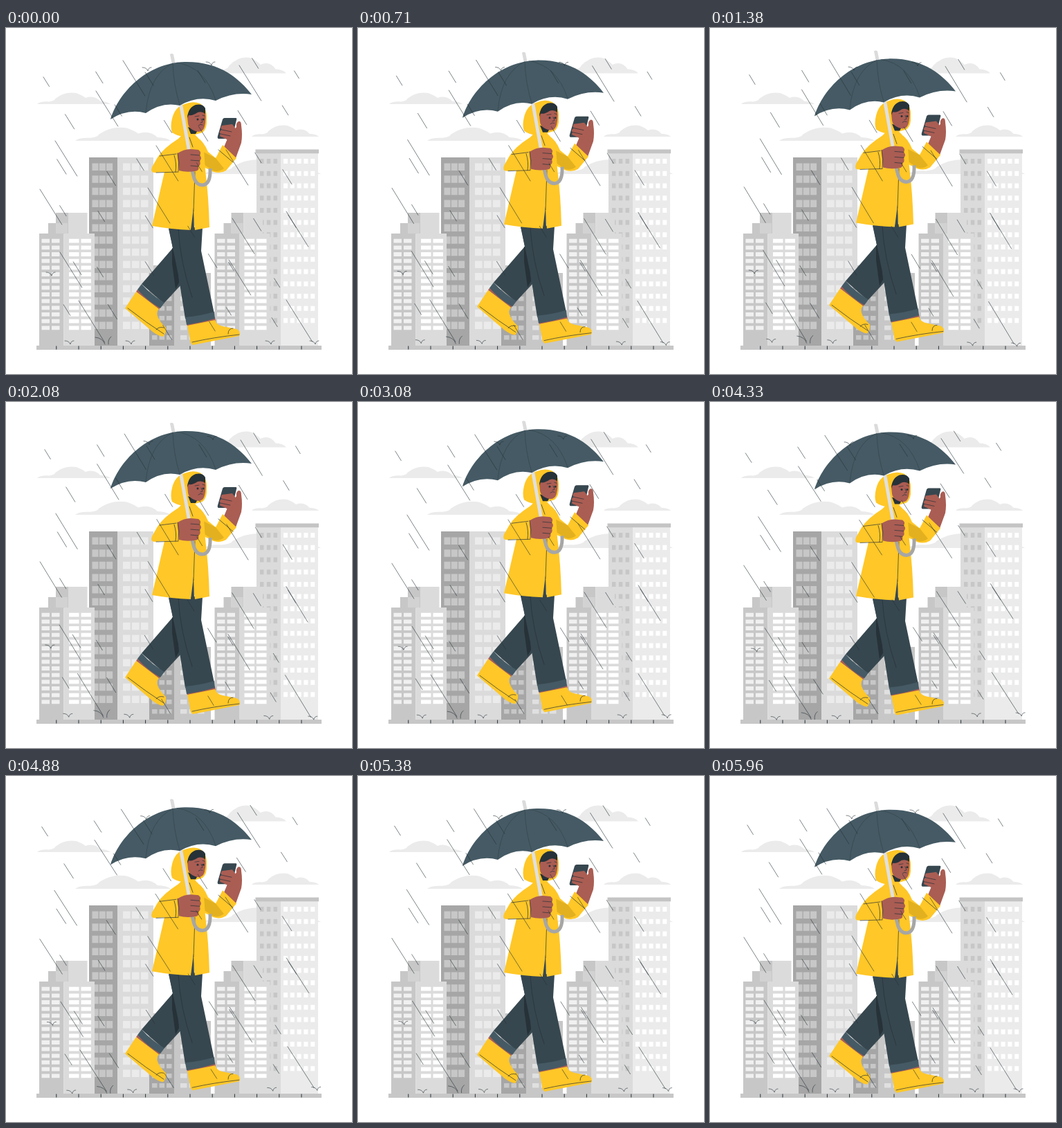
An HTML page that plays this animation: 500 by 500 pixels, repeating every 6 s.

```html
<!DOCTYPE html>
<html lang="en">
<head>
<meta charset="utf-8">
<title>Walking in the rain</title>
<style>
html, body { margin: 0; width: 100%; height: 100%; overflow: hidden; background: #fff; }
svg { display: block; width: 100vw; height: 100vh; }
.ink { fill: none; stroke: #263238; stroke-width: .7; stroke-linecap: round; stroke-linejoin: round; }
.dark { fill: #263238; }
.yellow { fill: #ffc727; }
.skin { fill: #aa5d53; }
.denim { fill: #37474f; }
.slate { fill: #455a64; }
#rain { stroke-width: .6; }
</style>
</head>
<body>
<svg viewBox="0 0 500 500">
  <g id="clouds" fill="#ebebeb"></g>
  <g id="city"></g>
  <path fill="#c7c7c7" d="M44 459H456V465H44Z"/>
  <path class="ink" stroke-dasharray="1 31.2" style="stroke-width:5;stroke-linecap:butt" d="M72.3 462H428"/>

  <g id="walker">
    <!-- far leg -->
    <path class="denim" d="M235 290L241 318L196 370L228 398L254 370L268 300Z"/>
    <path class="dark" d="M240 318L247 322L250 368L245 377L240 340Z"/>
    <path class="skin" d="M190 378L223 403L221 407L188 381Z"/>
    <path class="slate" d="M196 370Q210 386 229 397L223 405Q204 394 190 378Z"/>
    <path class="yellow" d="M188 381L221 406Q217 411 219 416Q222 425 231 433Q232 441 227 446Q220 445 212 439L172 405Z"/>
    <path class="ink" d="M176 405Q203 426 228 442M217 436Q221 431 228 433"/>
    <!-- near leg -->
    <path class="denim" d="M235 288H284L282 322L301 413L259 420L249 357Z"/>
    <path class="ink" d="M249 291Q252 340 269 389"/>
    <path class="skin" d="M261 425L302 418L303 424L262 431Z"/>
    <path class="slate" d="M259 418Q281 416 301 410L302 420Q281 426 261 429Z"/>
    <path class="yellow" d="M262 430L302 422Q304 429 313 431L333 435Q340 438 337 445L270 458Q266 456 266 450Z"/>
    <path class="ink" d="M269 454Q300 447 337 443M321 442Q321 434 328 434"/>
    <!-- phone arm -->
    <path class="skin" d="M315 172L320 160L329 149L333 143Q332 137 336 135Q340 134 340 141Q342 155 340 166L332 188Z"/>
    <path class="yellow" d="M276 158Q286 164 292 179L303 188L313 169L333 188L318 206Q310 211 300 208L282 199Z"/>
    <path fill="#e3b11f" d="M281 177L303 188L315 203Q307 209 299 206L284 196Z"/>
    <path class="ink" d="M307 176L328 194"/>
    <path class="denim" d="M316 130H332Q334 130 333 133L327 158Q326 160 323 160H307Q305 159 306 156L313 132Q314 130 316 130Z"/>
    <path class="skin" d="M327 139L312 141Q309 144 312 147Q307 149 310 153Q307 157 313 158L325 164L334 148Z"/>
    <path class="ink" d="M312 147L326 150M310 153L324 156"/>
    <!-- coat -->
    <path class="yellow" d="M256 153L249 160Q227 174 219 187L211 201Q208 209 215 209L229 208L211 286Q239 291 267 292L271 276L273 292L294 288Q293 245 288 205L286 177Q283 163 273 154Z"/>
    <path class="ink" d="M273 208L271 265M222 185L246 182M243 184Q247 196 245 208M217 209L249 208M265 158L270 172"/>
    <path class="denim" d="M271 260L267 292H272Z"/>
    <!-- head -->
    <path class="yellow" d="M257 157Q247 156 240 151Q237 143 240 131Q244 114 258 110Q270 105 280 109Q291 115 290 132Q291 145 284 151L270 155Z"/>
    <path class="dark" d="M263 143L267 153L274 153L277 148Z"/>
    <path class="skin" d="M262 128Q264 116 274 116L287 117Q290 129 287 142Q285 150 278 150Q264 147 263 138Z"/>
    <path class="dark" d="M262 130Q263 115 274 111Q284 109 288 116V124Q283 120 277 122Q270 127 264 126Z"/>
    <circle class="dark" cx="277" cy="132" r="1.5"/>
    <circle class="dark" cx="285" cy="132" r="1.5"/>
    <path class="ink" d="M273 128L279 127M284 126L287 127M282 131L284 136L281 137M278 141Q281 138 284 140"/>
    <!-- pole, handle and hand -->
    <path fill="#e0e0e0" d="M250 110H255L267 177H262Z"/>
    <path fill="none" stroke="#a6a6a6" stroke-width="5" d="M268 202L271 214Q274 227 284 227Q296 226 295 203"/>
    <path class="skin" d="M248 181Q257 175 267 175L278 176Q283 179 280 184Q284 188 280 192Q282 198 278 200Q280 206 273 207Q260 209 250 206Z"/>
    <path class="ink" d="M267 183L280 184M267 191L280 192M267 199L278 200M248 181Q251 194 249 207"/>
    <!-- umbrella -->
    <path fill="#dbdbdb" d="M237 38Q239 36 242 38L245 53H240Z"/>
    <path class="slate" d="M151 132C163 93 203 51 258 49C309 48 337 73 355 96Q329 92 303 105Q277 97 251 112Q226 106 202 123Q176 116 151 132Z"/>
    <path class="ink" opacity=".5" d="M241 51Q207 67 202 122M241 51Q242 82 251 111M247 50Q287 56 303 104"/>
  </g>
  <path id="rain" class="ink"/>
</svg>
<script>
const $ = id => document.getElementById(id);
const rect = (x, y, w, h, fill) => `<path fill="${fill}" d="M${x} ${y}h${w}v${h}h${-w}z"/>`;

// One outline, stretched over each cloud's width and height.
const cloud = (x, base, w, h) => `<path transform="translate(${x} ${base}) scale(${w / 100} ${h / 100})"
  d="M0 0Q4 -24 16 -20Q24 -26 25 -45Q38 -105 54 -88Q62 -70 66 -50Q78 -74 86 -24Q96 -22 100 0z"/>`;
$('clouds').innerHTML = cloud(45, 110, 106, 18) + cloud(100, 163, 138, 21) +
  cloud(295, 65.5, 110, 25) + cloud(355, 157, 97, 18) + cloud(285, 211, 170, 23);

// A wall from its top down to the ground, with an even grid of windows.
function wall(x, top, w, fill, glass, { cols, inset, step, pane, y, rows, pitch, h }) {
  let d = '';
  for (let r = 0; r < rows; r++)
    for (let c = 0; c < cols; c++)
      d += `M${x + inset + c * step} ${y + r * pitch}h${pane}v${h}h${-pane}z`;
  return rect(x, top, w, 459 - top, fill) + `<path fill="${glass}" d="${d}"/>`;
}

const tall = { cols: 3, y: 195.6, rows: 14, pitch: 17.6, h: 10.5 };
const slim = { y: 189, rows: 14, pitch: 17.72, h: 7 };
const wide = { cols: 2, y: 304.8, rows: 14, pitch: 9.66, h: 5.8 };
const low = { cols: 3, y: 360, rows: 7, pitch: 14, h: 6.5 };

const block = x =>
  rect(x + 24, 267, 18, 31, '#c7c7c7') + rect(x + 42, 267, 27.5, 31, '#dbdbdb') +
  rect(x + 13, 282, 11, 16, '#c7c7c7') + rect(x + 24, 282, 17, 16, '#d2d2d2') +
  wall(x, 297, 35.5, '#c7c7c7', '#f0f0f0', { ...wide, inset: 3.5, step: 14.5, pane: 11.5 }) +
  wall(x + 35.5, 297, 44.5, '#dbdbdb', '#fff', { ...wide, inset: 7.5, step: 17.5, pane: 14.5 });

$('city').innerHTML =
  wall(120, 187, 41, '#a6a6a6', '#c7c7c7', { ...tall, inset: 4.5, step: 10.3, pane: 9 }) +
  wall(161, 187, 52, '#dbdbdb', '#ebebeb', { ...tall, inset: 8, step: 13, pane: 10.5 }) +
  wall(362, 181, 35, '#dbdbdb', '#c7c7c7', { ...slim, cols: 3, inset: 5, step: 9.8, pane: 5.5 }) +
  wall(397, 181, 54, '#ebebeb', '#fff', { ...slim, cols: 5, inset: 4, step: 9.8, pane: 6 }) +
  rect(360.5, 175.5, 91.5, 5.7, '#c4c4c4') + rect(213, 343, 33, 12, '#c7c7c7') +
  wall(207, 354, 36, '#a6a6a6', '#c7c7c7', { ...low, inset: 4, step: 10.5, pane: 7.5 }) +
  wall(243, 354, 53, '#c7c7c7', '#e0e0e0', { ...low, inset: 9, step: 12.5, pane: 9.5 }) +
  block(48) + block(301.5);

// Streaks share one slope; short ones are scattered evenly by a seeded jitter.
let seed = 7;
const random = () => (seed = seed * 16807 % 2147483647) / 2147483647;
const streak = (x, y, len) => `M${x} ${y}l${len * .53} ${len * .85}`;
const splash = (x, y) => `M${x - 8} ${y - 3}q6 0 8 5q1 -5 5 -5`;

let rain = [[169, 47], [337, 54], [130, 91], [71, 163], [49, 233], [205, 231], [217, 170], [327, 275],
  [318, 176], [405, 265], [78, 324], [322, 335], [105, 394], [405, 393]]
  .map(([x, y]) => streak(x, y, y > 380 ? 71 : 60)).join('');
for (let row = 0; row < 6; row++)
  for (let col = 0; col < 6; col++)
    rain += streak(54 + 66 * col + 46 * random(), 34 + 72 * row + 40 * random(), 12 + 14 * random());
for (const x of [93, 181, 383, 447]) rain += splash(x, 455);
rain += splash(205, 60) + splash(297, 52) + splash(66, 356);
rain += 'M129 447Q140 448 143 457M148 457Q147 450 152 446';
$('rain').setAttribute('d', rain);

// Triangle wave from -1 up to 1 and back, once per loop.
const wave = p => 1 - 4 * Math.abs((p % 1 + 1) % 1 - .5);

function frame() {
  const p = performance.now() % 6000 / 6000;
  $('walker').setAttribute('transform', `translate(0 ${-5 - 5 * wave(p)})`);
  $('rain').setAttribute('transform', `rotate(${wave(p + .25)} 250 247)`);
  requestAnimationFrame(frame);
}
frame();
</script>
</body>
</html>
```
